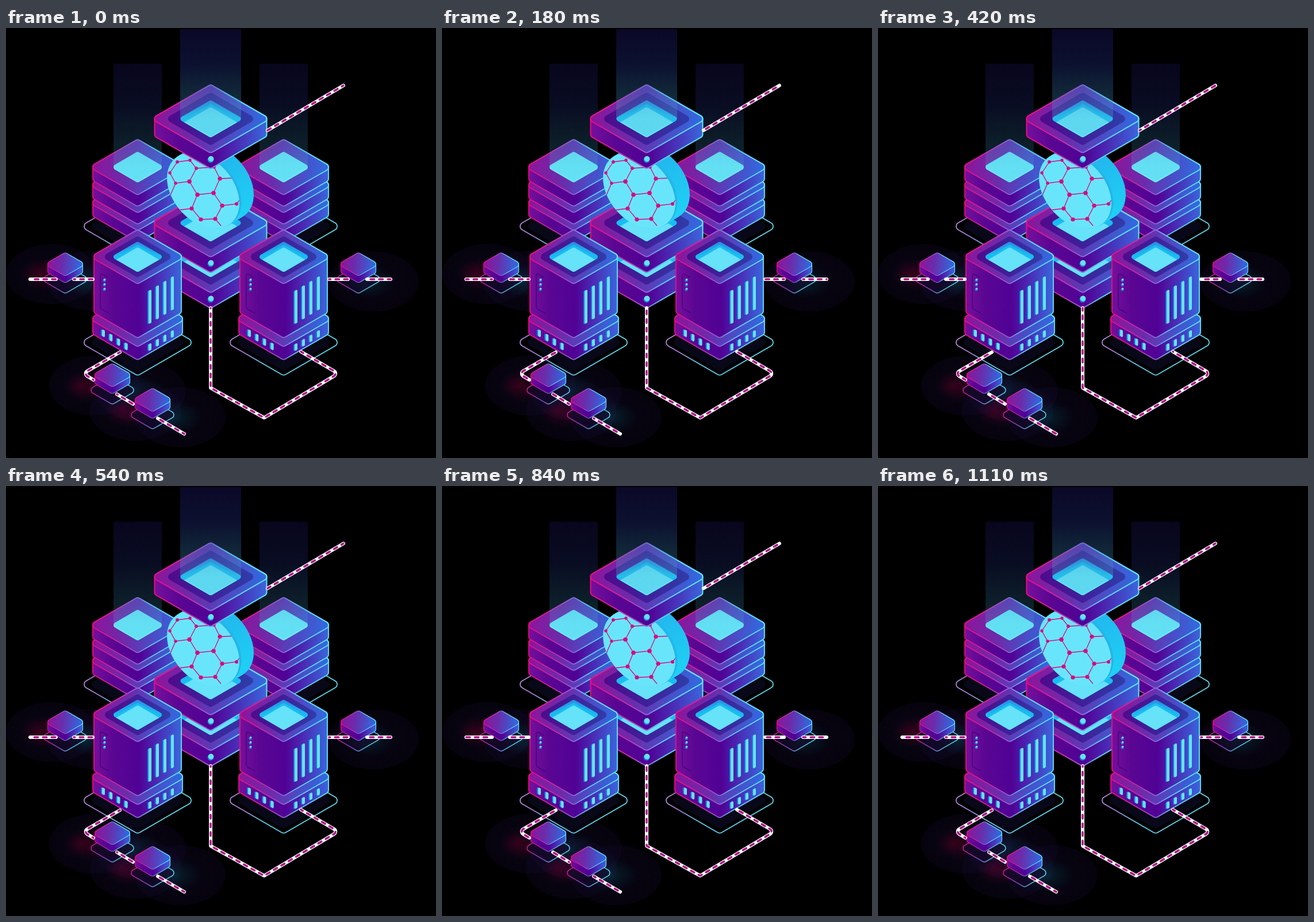
An HTML page with a canvas for the animation above (1140 ms loop, 748x748 px).

```html
<!DOCTYPE html>
<html lang="en">
<head>
<meta charset="utf-8">
<title>Isometric data network</title>
<style>
html, body { margin: 0; width: 100%; height: 100%; overflow: hidden; background: #000; }
canvas { display: block; width: 748px; height: 748px; }
</style>
</head>
<body>
<canvas id="stage" width="748" height="748"></canvas>
<script>
const SIZE = 748, CYCLE = 570, PERIOD = 15, SLOPE = 0.577;
const CYAN = '#66e2f9', BLUE = '#19bdf2', PINK = '#d6097f';
const view = document.getElementById('stage').getContext('2d');
const scene = document.createElement('canvas');
scene.width = scene.height = SIZE;
const g = scene.getContext('2d');

function linear(x0, y0, x1, y1, ...stops) {
  const grad = g.createLinearGradient(x0, y0, x1, y1);
  stops.forEach((s, i) => Array.isArray(s)
    ? grad.addColorStop(s[0], s[1])
    : grad.addColorStop(i / (stops.length - 1), s));
  return grad;
}

const edgeColor = (cx, hw) => linear(cx - hw, 0, cx + hw, 0,
  [0, '#ec0a82'], [0.3, '#c72aa8'], [0.5, '#8f62d8'], [0.64, '#5fc8f2'], [1, '#5fe6fb']);

function roundPoly(points, r) {
  const [a, b] = [points[points.length - 1], points[0]];
  g.beginPath();
  g.moveTo((a[0] + b[0]) / 2, (a[1] + b[1]) / 2);
  points.forEach((p, i) => g.arcTo(...p, ...points[(i + 1) % points.length], r));
  g.closePath();
}

// hw is the visible half width, after rounding
function diamond(cx, cy, hw, r) {
  const w = hw + r, h = w * SLOPE;
  roundPoly([[cx, cy - h], [cx + w, cy], [cx, cy + h], [cx - w, cy]], r);
}

function hull(cx, cy, hw, depth, r) {
  const h = (hw + r) * SLOPE, k = r * SLOPE, low = cy + depth;
  roundPoly([[cx, cy - h], [cx + hw, cy - k], [cx + hw, low + k],
    [cx, low + h], [cx - hw, low + k], [cx - hw, cy - k]], r);
}

function fill(color) { g.fillStyle = color; g.fill(); }
function stroke(color, width) { g.strokeStyle = color; g.lineWidth = width; g.stroke(); }

function box(cx, cy, hw, depth, r = 6, line = 1.8) {
  const edge = edgeColor(cx, hw), h = hw * SLOPE;
  hull(cx, cy, hw, depth, r);
  fill(linear(cx - hw, 0, cx + hw, 0,
    [0, '#76109c'], [0.22, '#5a0693'], [0.52, '#500295'], [0.72, '#4a2ab4'], [1, '#3a66dc']));
  diamond(cx, cy, hw, r);
  fill(linear(cx - hw, cy - h * 0.2, cx + hw, cy + h * 0.2,
    [0, '#8d159b'], [0.4, '#6b2cab'], [0.7, '#4a4dc6'], [1, '#2f6ce2']));
  stroke(edge, line);
  hull(cx, cy, hw, depth, r);
  stroke(edge, line);
}

function opening(cx, cy, ring, hw, drop) {
  diamond(cx, cy, ring, 6);
  fill(linear(cx - ring, 0, cx + ring, 0, '#500a8b', '#40209a', '#2f3da9'));
  g.save();
  diamond(cx, cy, hw, 4);
  fill(linear(0, cy - hw * 0.6, 0, cy, '#2a8fe4', BLUE));
  g.clip();
  diamond(cx, cy + drop * 0.55, hw, 4);
  fill(BLUE);
  diamond(cx, cy + drop, hw, 4);
  fill(CYAN);
  g.restore();
}

function plate(cx, cy) {
  diamond(cx, cy, 80, 6);
  fill('#080818');
  diamond(cx, cy, 93, 7);
  stroke(linear(cx - 93, 0, cx + 93, 0,
    [0, '#b58ae0'], [0.12, '#a678d8'], [0.3, '#62cdec'], [1, '#5fdcf2']), 1.7);
}

function glow(x, y, tint, shift) {
  g.save();
  g.translate(x, y);
  g.scale(1, 0.66);
  const grad = g.createRadialGradient(shift, 0, 0, 0, 0, 79);
  grad.addColorStop(0, tint);
  grad.addColorStop(0.55, 'rgba(22,12,52,.32)');
  grad.addColorStop(1, 'rgba(18,10,44,.3)');
  g.beginPath();
  g.arc(0, 0, 79, 0, 7);
  fill(grad);
  g.restore();
}
const warmGlow = (x, y) => glow(x, y, 'rgba(130,4,66,.42)', -22);
const coolGlow = (x, y) => glow(x, y, 'rgba(16,96,128,.36)', -14);

function beam(cx, top, bottom, hw, power) {
  g.beginPath();
  g.moveTo(cx - hw, top);
  g.lineTo(cx + hw, top);
  g.lineTo(cx + hw, bottom);
  g.lineTo(cx, bottom + hw * SLOPE);
  g.lineTo(cx - hw, bottom);
  fill(linear(0, top, 0, bottom,
    [0, `rgba(34,24,120,${0.33 * power})`], [0.4, `rgba(36,50,140,${0.34 * power})`],
    [1, `rgba(70,190,215,${0.29 * power})`]));
}

function stud(x, y, r) {
  g.beginPath();
  g.arc(x, y + 1, r, 0, 7);
  fill('#1c7fe0');
  g.beginPath();
  g.arc(x + 0.6, y - 0.4, r - 0.7, 0, 7);
  fill(CYAN);
}

// Upright slot on a side face; lean is the slope of that face
function slot(x, y, w, h, lean) {
  const bar = (left, wide, color) => {
    const d = wide * lean / 2;
    roundPoly([[left, y - h / 2 - d], [left + wide, y - h / 2 + d],
      [left + wide, y + h / 2 + d], [left, y + h / 2 - d]], 1.6);
    fill(color);
  };
  bar(x - w / 2, w, '#1f78e4');
  bar(x - w / 2 + 2, w - 2, CYAN);
}

function backStack(cx) {
  plate(cx, 345);
  for (let i = 2; i >= 0; i--) box(cx, 242 + i * 31, 78, 20);
  diamond(cx, 242, 42, 5);
  fill('#6be8fb');
  beam(cx, 62, 242, 42, 0.72);
}

function tower(cx) {
  plate(cx, 547);
  box(cx, 506, 78, 23);
  box(cx, 398, 76, 94);
  opening(cx, 398, 57, 42, 10);
  for (let i = 0; i < 4; i++) {
    slot(cx + 20.5 + i * 13, 485 - i * 7.8, 7, 58, -SLOPE);
    slot(cx + 20.5 + i * 13, 555 - i * 7.6, 7, 12, -SLOPE);
    slot(cx - 60.5 + i * 13.2, 531 + i * 7.6, 7, 12, SLOPE);
  }
  for (let i = 0; i < 3; i++) stud(cx - 58, 438 + i * 8, 2.5);
  g.beginPath();
  g.moveTo(cx - 52, 434);
  g.lineTo(cx - 62, 428);
  g.quadraticCurveTo(cx - 65, 427, cx - 65, 431);
  g.lineTo(cx - 65, 484);
  g.quadraticCurveTo(cx - 65, 488, cx - 61, 490);
  g.lineTo(cx - 50, 496);
  stroke('rgba(52,0,104,.8)', 1.2);
}

function core(cy) {
  box(356, cy, 97.5, 27, 6, 2);
  opening(356, cy, 74, 52.5, 12);
  stud(356, cy + 70, 5.5);
}

function coinFace(dx, dy) {
  g.beginPath();
  g.ellipse(343 + dx, 283 + dy, 74.5, 52.5, 0.855, 0, 7);
}

function coin() {
  const side = linear(370, 215, 425, 320, '#22b4ee', '#1fd0f4');
  for (let i = 50; i > 0; i--) {
    coinFace(i / 2, -i * 0.3);
    fill(i < 8 ? '#24b6ea' : side);
  }
  coinFace(0, 0);
  fill('#69e5fb');
  g.save();
  g.clip();
  const chains = [
    [298, 233, 320, 230, 331, 244, 319, 267, 295, 270, 285, 252, 298, 233],
    [331, 244, 362, 242, 372, 262, 361, 287, 333, 290, 319, 267],
    [333, 290, 323, 314, 339, 333, 364, 332, 376, 309, 361, 287],
    [372, 262, 398, 261],
    [376, 309, 401, 306, 412, 292],
    [364, 332, 374, 344],
    [295, 270, 285, 293],
    [323, 314, 298, 317]
  ];
  for (const c of chains) {
    g.beginPath();
    for (let i = 0; i < c.length; i += 2) g.lineTo(c[i], c[i + 1]);
    stroke(PINK, 1.3);
  }
  // Joints sit where chains meet; loose ends stay bare
  for (const c of chains.slice(0, 3)) {
    for (let i = 0; i < c.length; i += 2) {
      g.beginPath();
      g.arc(c[i], c[i + 1], c[i] > 315 && c[i + 1] > 255 ? 3.6 : 2.7, 0, 7);
      fill(PINK);
    }
  }
  g.beginPath();
  g.arc(401, 306, 3, 0, 7);
  fill(PINK);
  g.restore();
}

function node(cx, cy) {
  diamond(cx, cy + 26, 37, 6);
  fill('rgba(22,10,48,.55)');
  stroke(linear(cx - 37, 0, cx + 37, 0,
    [0, '#d01a92'], [0.35, '#8a4ac0'], [0.6, '#4fc0dc'], [1, '#5fdcf2']), 1.4);
  box(cx, cy, 30.5, 12, 5, 1.1);
}

function drawScene() {
  g.fillStyle = '#000';
  g.fillRect(0, 0, SIZE, SIZE);
  warmGlow(79, 428);
  coolGlow(150, 440);
  coolGlow(639, 441);
  warmGlow(154, 622);
  coolGlow(234, 632);
  warmGlow(225, 666);
  coolGlow(303, 677);
  backStack(229);
  backStack(483);
  core(401);
  core(339);
  coin();
  core(158);
  beam(356, 2, 158, 53, 1);
  tower(229);
  tower(483);
  node(103, 411);
  node(613, 411);
  node(185, 604);
  node(255, 647);
}

// Each cable: dash phase, then its points
const cables = [
  [0, 455, 178, 587, 100],
  [7, 42, 437, 87, 437],
  [4, 118, 437, 151, 437],
  [4, 562, 437, 595, 437],
  [9, 628, 437, 669, 437],
  [3, 198, 564, 134, 601, 152, 612],
  [5, 193, 637, 221, 654],
  [10, 264, 679, 310, 706],
  [2, 513, 563, 578, 601, 449, 678, 356, 626, 356, 487]
];

function cable([phase, ...p], flow) {
  const n = p.length;
  view.beginPath();
  view.moveTo(p[0], p[1]);
  for (let i = 2; i < n - 2; i += 2) {
    const bend = p[i] === 134 || p[i] === 578 ? 5 : 1;
    view.arcTo(p[i], p[i + 1], p[i + 2], p[i + 3], bend);
  }
  view.lineTo(p[n - 2], p[n - 1]);
  view.setLineDash([]);
  view.strokeStyle = '#fff';
  view.lineWidth = 6;
  view.stroke();
  view.setLineDash([6.5, PERIOD - 6.5]);
  view.lineDashOffset = phase - flow;
  view.strokeStyle = '#b00f8a';
  view.lineWidth = 3.6;
  view.stroke();
}

function render(now) {
  const flow = (now % CYCLE) / CYCLE * PERIOD;
  view.drawImage(scene, 0, 0);
  view.lineCap = view.lineJoin = 'round';
  for (const c of cables) cable(c, flow);
  requestAnimationFrame(render);
}

drawScene();
render(performance.now());
</script>
</body>
</html>
```
